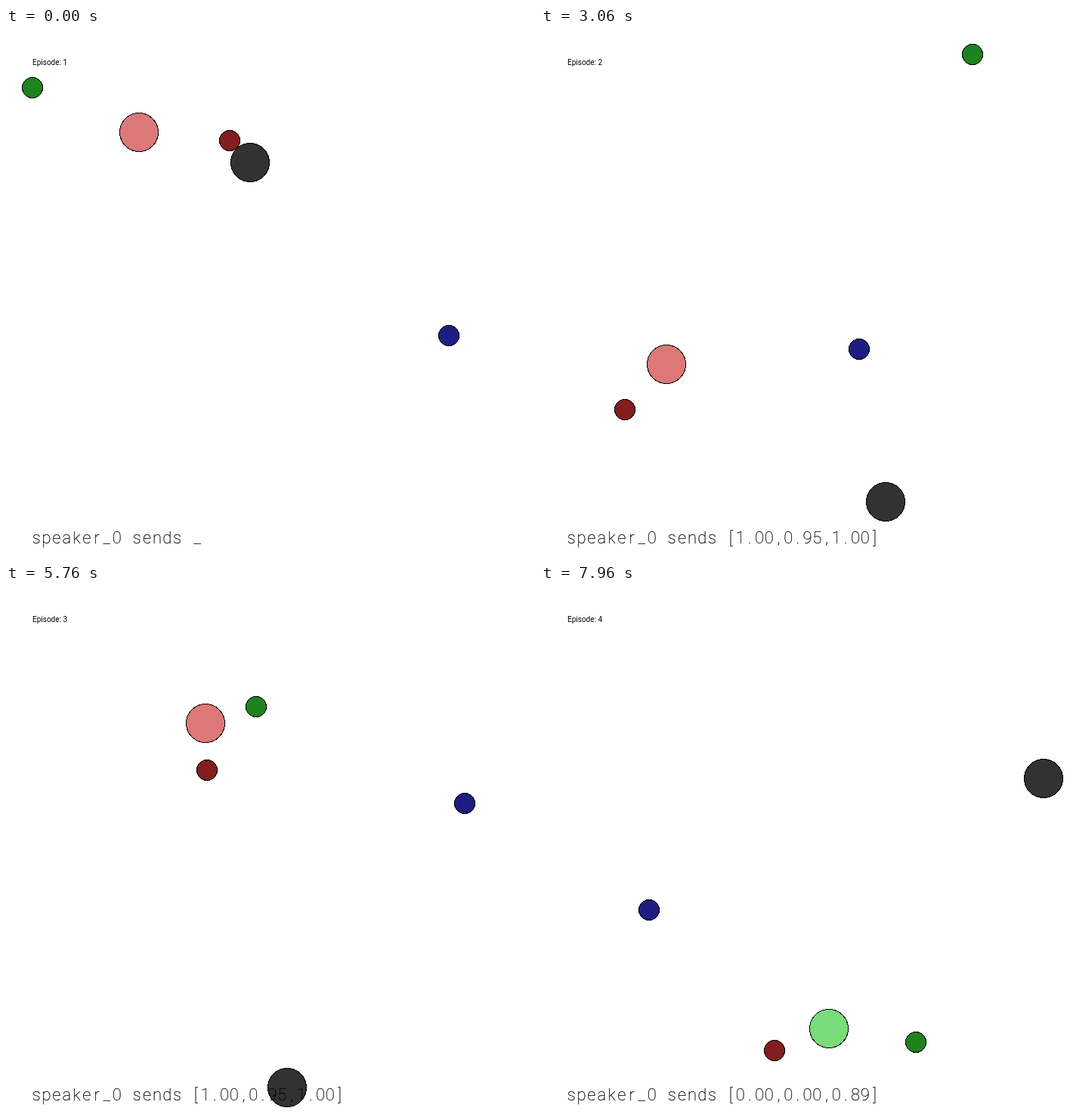
An HTML page that plays this animation: 700 px wide and 700 px high, repeating every 8 s.

```html
<!DOCTYPE html>
<html>
<head>
<meta charset="utf-8">
<style>
html, body { margin: 0; width: 100%; height: 100%; overflow: hidden; background: #fff; }
svg { display: block; width: 700px; height: 700px; }
circle { stroke: #000; stroke-width: 1; shape-rendering: crispEdges; }
text { font-family: Roboto, "Liberation Sans", sans-serif; }
#episode { font-size: 10px; }
#message { font-size: 22px; font-weight: 100; text-anchor: middle; stroke: #000; stroke-width: .25px; }
</style>
</head>
<body>
<svg viewBox="0 0 700 700">
  <g id="scene"></g>
  <text id="episode" x="35" y="49"></text>
  <text id="message" y="682" xml:space="preserve"></text>
</svg>
<script>
const LOOP = 8000, STEP = 100, CENTER = 350, REACH = 315, FRICTION = 0.75;
const PINK = 'rgb(220,120,120)', MINT = 'rgb(120,220,120)';
const RED_WORDS = '[1.00,0.95,1.00]', GREEN_WORDS = '[0.00,0.00,0.89]';

// One coordinate of the listener: pulled from its start to a goal, braked by its speed
const axis = (from, goal, pull = 0.12, brake = 0.05) => ({ from, goal, pull, brake });

// bodies: speaker, then the red, green and blue landmarks
const episodes = [
  { start: 0, color: PINK, words: RED_WORDS, thrust: 16.8,
    bodies: [[323, 178], [296, 149], [35, 79], [586, 407]],
    listener: [axis(176, 356, 0.25, 0.08), axis(138, 128, 0.02)] },
  { start: 1960, color: PINK, words: RED_WORDS, thrust: 16.8,
    bodies: [[456, 627], [111, 505], [571, 35], [421, 425]],
    listener: [axis(554, 203), axis(49, 412)] },
  { start: 4460, color: PINK, words: RED_WORDS, thrust: 18.8,
    bodies: [[372, 665], [266, 245], [331, 161], [607, 289]],
    listener: [axis(685, 285, 0.12, 0.15), axis(152, 212, 0.02)] },
  { start: 6960, color: MINT, words: GREEN_WORDS, thrust: 16.8,
    bodies: [[665, 256], [309, 616], [496, 605], [143, 430]],
    listener: [axis(690, 416), axis(400, 557)] }
];

const $ = id => document.getElementById(id);

function addCircle(radius, fill) {
  const c = document.createElementNS('http://www.w3.org/2000/svg', 'circle');
  c.setAttribute('r', radius - 0.5);
  c.setAttribute('fill', fill);
  return $('scene').appendChild(c);
}

const speaker = addCircle(26, 'rgb(50,50,50)');
const listener = addCircle(26, PINK);
const marks = ['rgb(130,30,30)', 'rgb(30,130,30)', 'rgb(30,30,130)'].map(c => addCircle(14, c));
const fixed = [speaker, ...marks];

function place(circle, [x, y], zoom) {
  const fit = v => Math.round(CENTER + (v - CENTER) * zoom);
  circle.setAttribute('cx', fit(x));
  circle.setAttribute('cy', fit(y));
}

// The listener waits one step for the message, then thrusts towards its goal
function travel({ from, goal, pull, brake }, thrust, step) {
  let pos = from, speed = 0;
  for (let i = 1; i < step; i++) {
    const wish = pull * (goal - pos) - brake * speed;
    speed = FRICTION * speed + Math.max(-thrust, Math.min(thrust, wish));
    pos += speed;
  }
  return pos;
}

// Letters sit in fixed cells; the sent values are set a little tighter
function say(words) {
  const line = 'speaker_0 sends ' + words;
  const cell = i => i < 16 || words === '_' ? 40.3 + 13.3 * i : 251 + 12.7 * (i - 16);
  $('message').setAttribute('x', [...line].map((_, i) => cell(i).toFixed(1)).join(' '));
  $('message').textContent = line;
}

function draw(now) {
  const t = now % LOOP;
  const number = episodes.filter(e => e.start <= t).length;
  const { start, color, words, thrust, bodies, listener: axes } = episodes[number - 1];
  const step = Math.floor((t - start) / STEP);
  const pos = axes.map(a => travel(a, thrust, step));

  // The camera zooms out when the listener is the outermost body
  const zoom = Math.min(1, REACH / Math.max(...pos.map(v => Math.abs(v - CENTER))));
  fixed.forEach((c, i) => place(c, bodies[i], zoom));
  place(listener, pos, zoom);
  listener.setAttribute('fill', color);
  $('episode').textContent = 'Episode: ' + number;
  say(step ? words : '_');
  requestAnimationFrame(draw);
}

draw(0);
</script>
</body>
</html>
```
